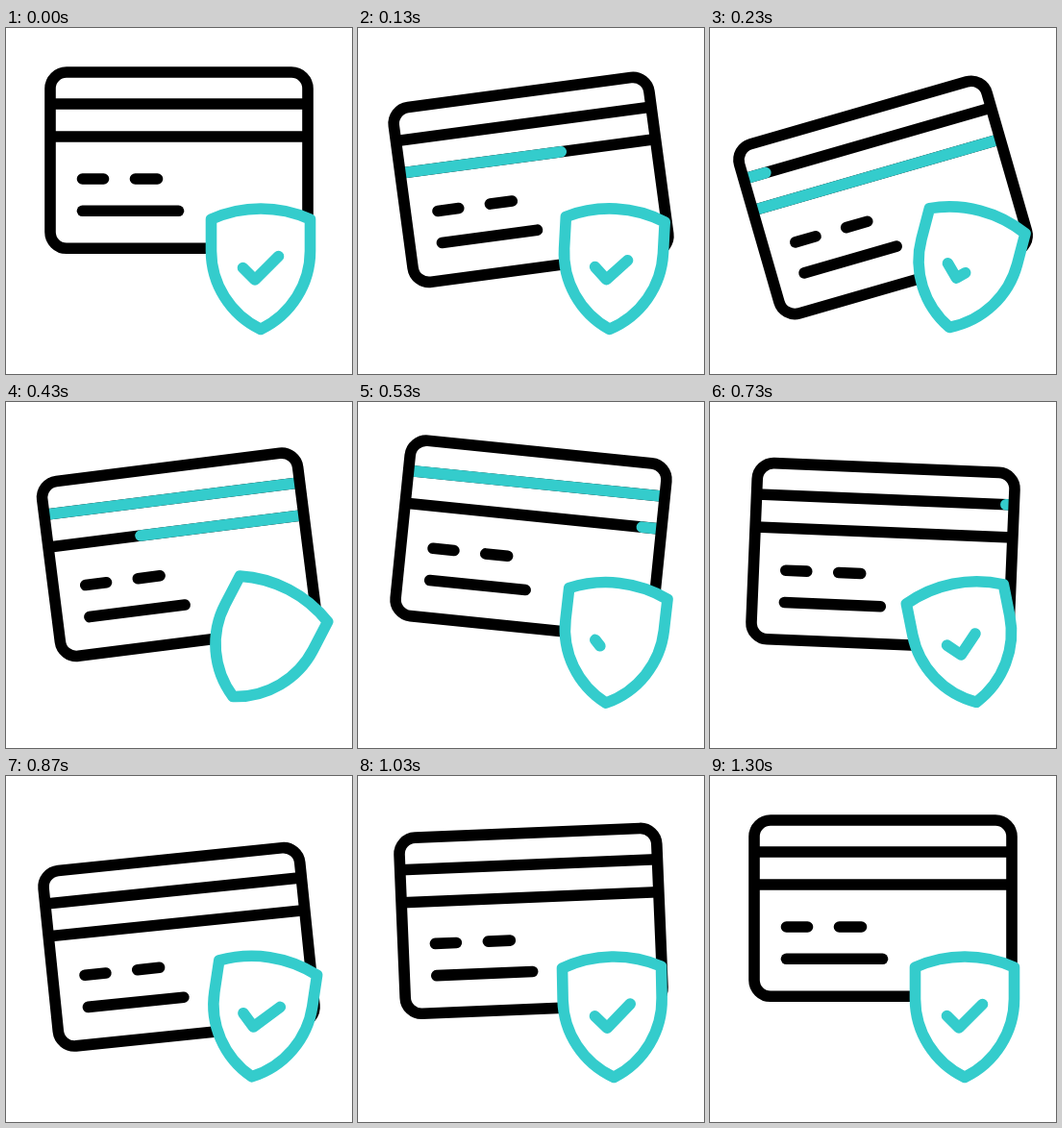
An HTML page with a canvas that plays this animation: 360x360 px, repeating every 1670 ms.

```html
<!DOCTYPE html>
<html lang="en">
<head>
<meta charset="utf-8">
<title>Secure card</title>
<style>
  html, body { margin: 0; width: 100%; height: 100%; overflow: hidden; background: #fff; }
  canvas { display: block; width: 100vw; height: 100vh; object-fit: contain; }
</style>
</head>
<body>
<canvas id="stage" width="360" height="360"></canvas>
<script>
const ctx = document.getElementById('stage').getContext('2d');
const LOOP = 1670, STEP = 33.4;
const BLACK = '#000', TEAL = '#34cccc';

// Keys are [step, value] pairs; times are in steps of the loop.
const cardAngle = [[0, 0], [9.1, -18.6], [18, 9.4], [26.5, -6], [34.4, 0]];
const cardDrop = [[0, 0], [8, 40.5], [18.1, 1.2], [25.5, 40.5], [34.4, 0]];
const shieldAngle = [[2, 0], [12, 29.5], [20, -16.5], [27, 10], [33, -5], [39, 0]];
const checkEnd = [[2, 1], [12.6, 0], [13, 0], [25, 1]];
const upperEnd = [[5.74, 0], [12.74, 1]], upperStart = [[15.7, 0], [22.7, 1]];
const lowerEnd = [[0, 0], [6.8, 1]], lowerStart = [[10.16, 0], [17.16, 1]];

function valueAt(keys, t) {
  if (t <= keys[0][0]) return keys[0][1];
  for (let i = 1; i < keys.length; i++) {
    const [t0, a] = keys[i - 1], [t1, b] = keys[i];
    if (t < t1) {
      const p = (t - t0) / (t1 - t0);
      return a + (b - a) * p * p * (3 - 2 * p);
    }
  }
  return keys[keys.length - 1][1];
}

function line(color, ...points) {
  ctx.strokeStyle = color;
  ctx.beginPath();
  points.forEach(([x, y]) => ctx.lineTo(x, y));
  ctx.stroke();
}

function rotated(x, y, dy, degrees, draw) {
  ctx.save();
  ctx.translate(x, y + dy);
  ctx.rotate(degrees * Math.PI / 180);
  ctx.translate(-x, -y);
  draw();
  ctx.restore();
}

function stripe(y, from, to) {
  const left = 47, width = 266;
  line(BLACK, [left, y], [left + width, y]);
  if (to > from) line(TEAL, [left + width * from, y], [left + width * to, y]);
}

function drawCard(t) {
  stripe(79, valueAt(upperStart, t), valueAt(upperEnd, t));
  stripe(113, valueAt(lowerStart, t), valueAt(lowerEnd, t));
  line(BLACK, [79.5, 157], [101.5, 157]);
  line(BLACK, [134.5, 157], [157.5, 157]);
  line(BLACK, [79.5, 190.3], [179.5, 190.3]);
  ctx.beginPath();
  ctx.roundRect(46, 46, 268, 183.3, 17);
  ctx.stroke();
}

function drawCheck(part) {
  if (part <= 0) return;
  const a = [246.5, 249.5], b = [259, 262], c = [283.5, 237.5];
  const first = Math.hypot(b[0] - a[0], b[1] - a[1]);
  const second = Math.hypot(c[0] - b[0], c[1] - b[1]);
  const length = part * (first + second);
  const along = (p, q, k) => [p[0] + (q[0] - p[0]) * k, p[1] + (q[1] - p[1]) * k];
  if (length <= first) line(TEAL, a, along(a, b, length / first));
  else line(TEAL, a, b, along(b, c, (length - first) / second));
}

const shield = new Path2D(
  'M213.5 199 Q238 188 265 188 Q292 188 316.5 199 V232 ' +
  'C316.5 266 297 298 265 313.5 C233 298 213.5 266 213.5 232 Z');

function drawShield(t) {
  ctx.fillStyle = '#fff';
  ctx.fill(shield);
  ctx.strokeStyle = TEAL;
  ctx.stroke(shield);
  drawCheck(valueAt(checkEnd, t));
}

function render(now) {
  const t = Math.floor((now % LOOP + 6) / STEP) % 50;
  ctx.fillStyle = '#fff';
  ctx.fillRect(0, 0, 360, 360);
  ctx.lineWidth = 11.6;
  ctx.lineCap = ctx.lineJoin = 'round';
  rotated(180, 137.5, valueAt(cardDrop, t), valueAt(cardAngle, t), () => drawCard(t));
  rotated(265, 251, 0, valueAt(shieldAngle, t), () => drawShield(t));
}

const start = performance.now();
function tick() {
  render(performance.now() - start);
  requestAnimationFrame(tick);
}
tick();
</script>
</body>
</html>
```
